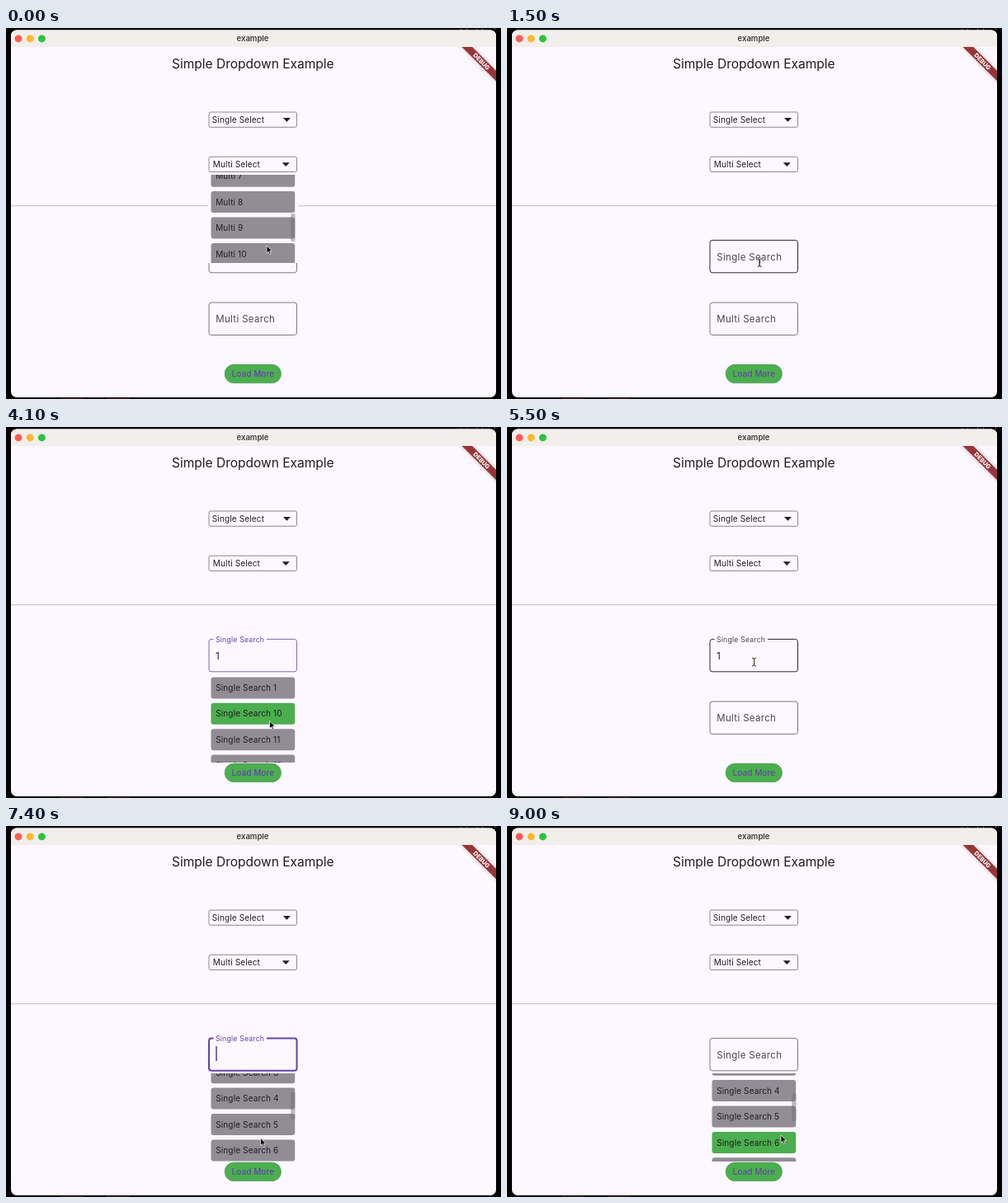
Animation of 600x450 px, one loop 9.1 s. Source, as an HTML page with a canvas:

```html
<!DOCTYPE html>
<html lang="en">
<head>
<meta charset="utf-8">
<title>Simple Dropdown Example</title>
<style>
html, body { margin: 0; width: 100%; height: 100%; overflow: hidden; background: #000; }
canvas { display: block; }
</style>
</head>
<body>
<canvas id="stage" width="600" height="450"></canvas>
<script>
const c = document.getElementById('stage').getContext('2d');
const LOOP = 9100, STEP = 100, PITCH = 31.4, VIEW = 107;
const PAGE = '#fdf7ff', INK = '#1f1c22', GREY = '#49454f', PURPLE = '#6345a8', GREEN = '#4bae4f';

// Keyframes: time, then values
const POINTER = [[0, 316, 264], [600, 316, 264], [900, 317, 285], [1100, 317, 285],
  [1600, 303.5, 284.5], [3400, 303.5, 284.5], [3900, 319.5, 356.5], [4500, 319.5, 356.5],
  [5300, 299.5, 285], [6500, 299.5, 285], [7000, 308.5, 378.5], [8100, 308.5, 378.5], [8700, 332, 375]];
const MULTI_SCROLL = [[0, 234.5], [500, 250]];
const SINGLE_SCROLL = [[6900, 0], [7400, 111.4], [7900, 120.9]];

function at(keys, t) {
  const i = keys.findIndex(k => k[0] > t);
  if (i < 0) return keys[keys.length - 1].slice(1);
  if (i === 0) return keys[0].slice(1);
  const a = keys[i - 1], b = keys[i], p = (t - a[0]) / (b[0] - a[0]);
  return a.slice(1).map((v, n) => v + (b[n + 1] - v) * p);
}
const within = (t, a, b) => t >= a && t < b;

function text(s, x, y, size, color = INK, spacing = 0.14, weight = 400, align = 'left') {
  c.font = `${weight} ${size}px Inter, sans-serif`;
  c.letterSpacing = spacing + 'px';
  c.textAlign = align;
  c.textBaseline = 'alphabetic';
  c.fillStyle = color;
  c.fillText(s, x, y + size * 0.36);
}
function box(x, y, w, h, r, fill, stroke, line = 1) {
  c.beginPath();
  c.roundRect(x, y, w, h, r);
  if (fill) { c.fillStyle = fill; c.fill(); }
  if (stroke) { c.strokeStyle = stroke; c.lineWidth = line; c.stroke(); }
}
function rect(x, y, w, h, color) {
  c.fillStyle = color;
  c.fillRect(x, y, w, h);
}
function poly(points, fill) {
  c.beginPath();
  points.forEach(p => c.lineTo(...p));
  c.closePath();
  c.fillStyle = fill;
  c.fill();
}

function banner() {
  c.save();
  c.beginPath();
  c.rect(500, 23, 94, 80);
  c.clip();
  c.translate(594, 23);
  c.rotate(Math.PI / 4);
  c.shadowColor = 'rgba(0,0,0,.5)';
  c.shadowBlur = 5;
  rect(-34, 20.5, 68, 8.7, 'rgba(0,0,0,.5)');
  c.shadowColor = 'transparent';
  rect(-34, 20.5, 68, 8.7, 'rgba(183,28,28,.63)');
  text('DEBUG', 0, 24.9, 7.2, '#fff', 0, 800, 'center');
  c.restore();
}

function shell() {
  rect(0, 0, 600, 450, '#000');
  c.strokeStyle = '#777';
  c.lineWidth = 1;
  for (const x of [555, 574]) {
    c.beginPath();
    c.arc(x, 0, 4, 0.2, Math.PI - 0.2);
    c.stroke();
  }
  rect(592, 0, 1, 2, '#666');
  for (const x of [66, 122]) rect(x, 449, 28, 1, '#5c2626');
  box(6, 2.5, 588, 445.5, 7, PAGE);
  box(6, 2.5, 588, 20.5, [7, 7, 0, 0], '#f1eeec');
  ['#ff5b53', '#fdb92c', '#2bc440'].forEach((color, i) => box(10.5 + i * 14.2, 8.4, 9, 9, 4.5, color));
  text('example', 299, 12.8, 9.5, '#3d3b3d', 0, 600, 'center');
  text('Simple Dropdown Example', 299.3, 43, 15.5, INK, 0, 400, 'center');
  banner();
  rect(6, 215, 588, 1.3, '#d0cad2');
}

function select(label, x, y, arrow) {
  box(246, y, 106.5, 18.3, 2, null, '#8d8990');
  text(label, x, y + 9.3, 10);
  poly([[arrow - 4.5, y + 7], [arrow + 4.5, y + 7], [arrow, y + 11.7]], INK);
}

function field(label, y, { floated, value = '', border = '#7d7981', line = 1, color = GREY, caret } = {}) {
  box(246, y, 106.5, 39.4, 3, null, border, line);
  if (floated) {
    rect(251.5, y - 2, 64.5, 4, PAGE);
    text(label, 254, y + 0.4, 8.7, color, 0.2);
  } else {
    text(label, 254.3, y + 20, 11.4, GREY, 0.37);
  }
  text(value, 254, y + 20.7, 11.7, INK, 0.3);
  if (caret) rect(value ? 261.5 : 254.2, y + 9.7, 1.6, 18, PURPLE);
}

function list(name, top, scroll, numbers, picked) {
  c.save();
  c.beginPath();
  c.rect(244.5, top, 109.5, VIEW);
  c.clip();
  rect(244, top, 111, VIEW, PAGE);
  numbers.forEach((n, i) => {
    const y = top + 3.4 + i * PITCH - scroll;
    if (y < top - PITCH || y > top + VIEW) return;
    box(248.5, y, 101.7, 26, 3, n === picked ? GREEN : '#918d95');
    text(`${name} ${n}`, 254.2, y + 13, 10);
  });
  if (scroll > 0) box(345.3, top + scroll * 0.2, 5.2, 34, 2, 'rgba(110,106,114,.45)');
  c.restore();
}

function pointer(x, y, beam) {
  if (beam) {
    const path = new Path2D(`M${x - 2.5} ${y - 5}q2.5 0 2.5 2v6q0 2 -2.5 2M${x + 2.5} ${y - 5}q-2.5 0 -2.5 2v6q0 2 2.5 2`);
    c.strokeStyle = '#fff';
    c.lineWidth = 2.2;
    c.stroke(path);
    c.strokeStyle = '#222';
    c.lineWidth = 1;
    c.stroke(path);
    return;
  }
  const shape = [[0, 0], [0, 9.2], [2.1, 7.3], [3.6, 10.7], [5.1, 10], [3.6, 6.8], [6.4, 6.6]].map(p => [x + p[0], y + p[1]]);
  poly(shape, '#000');
  c.strokeStyle = '#eee';
  c.lineWidth = 0.8;
  c.stroke();
}

function searchState(t, hover) {
  const value = within(t, 3200, 6400) ? '1' : '';
  const focused = within(t, 2500, 4000) || within(t, 6000, 8500);
  const state = { value, floated: focused || value !== '', border: hover ? '#2a272d' : '#7d7981' };
  if (focused) {
    const start = t < 3200 ? 2500 : t < 6000 ? 3200 : t < 6400 ? 6000 : 6400;
    state.caret = (t - start) % 1000 < 500;
    if (t >= 2800 && !within(t, 6000, 6200)) Object.assign(state, { border: PURPLE, line: 2, color: PURPLE });
  } else if (within(t, 4000, 4200)) {
    Object.assign(state, { border: '#7d6bb3', color: PURPLE });
  }
  return state;
}

function draw(t) {
  const [x, y] = at(POINTER, t);
  const multiOpen = t < 800;
  const singleOpen = within(t, 2500, 4600) || t >= 6100;
  const hover = !multiOpen && y > 257 && y < 297;
  const all = Array.from({ length: 20 }, (_, i) => i);
  const search = searchState(t, hover);

  shell();
  select('Single Select', 249.8, 102, 340.4);
  select('Multi Select', 250.8, 156.2, 339.2);
  field('Single Search', 257.4, search);
  field('Multi Search', 333, {});
  if (multiOpen) list('Multi', 178, at(MULTI_SCROLL, t)[0], all);
  if (singleOpen) {
    const shown = all.filter(n => String(n).includes(search.value));
    const picked = t >= 9000 ? 6 : within(t, 4000, 4600) ? 10 : -1;
    list('Single Search', 300, at(SINGLE_SCROLL, t)[0], shown, picked);
  }
  box(265, 408, 68.6, 22.8, 11.4, GREEN, 'rgba(60,110,70,.35)', 0.8);
  text('Load More', 299.3, 419.5, 10, PURPLE, 0.07, 500, 'center');
  pointer(x, y, hover);
}

function frame() {
  draw(Math.floor(performance.now() % LOOP / STEP) * STEP);
  requestAnimationFrame(frame);
}
frame();
</script>
</body>
</html>
```
